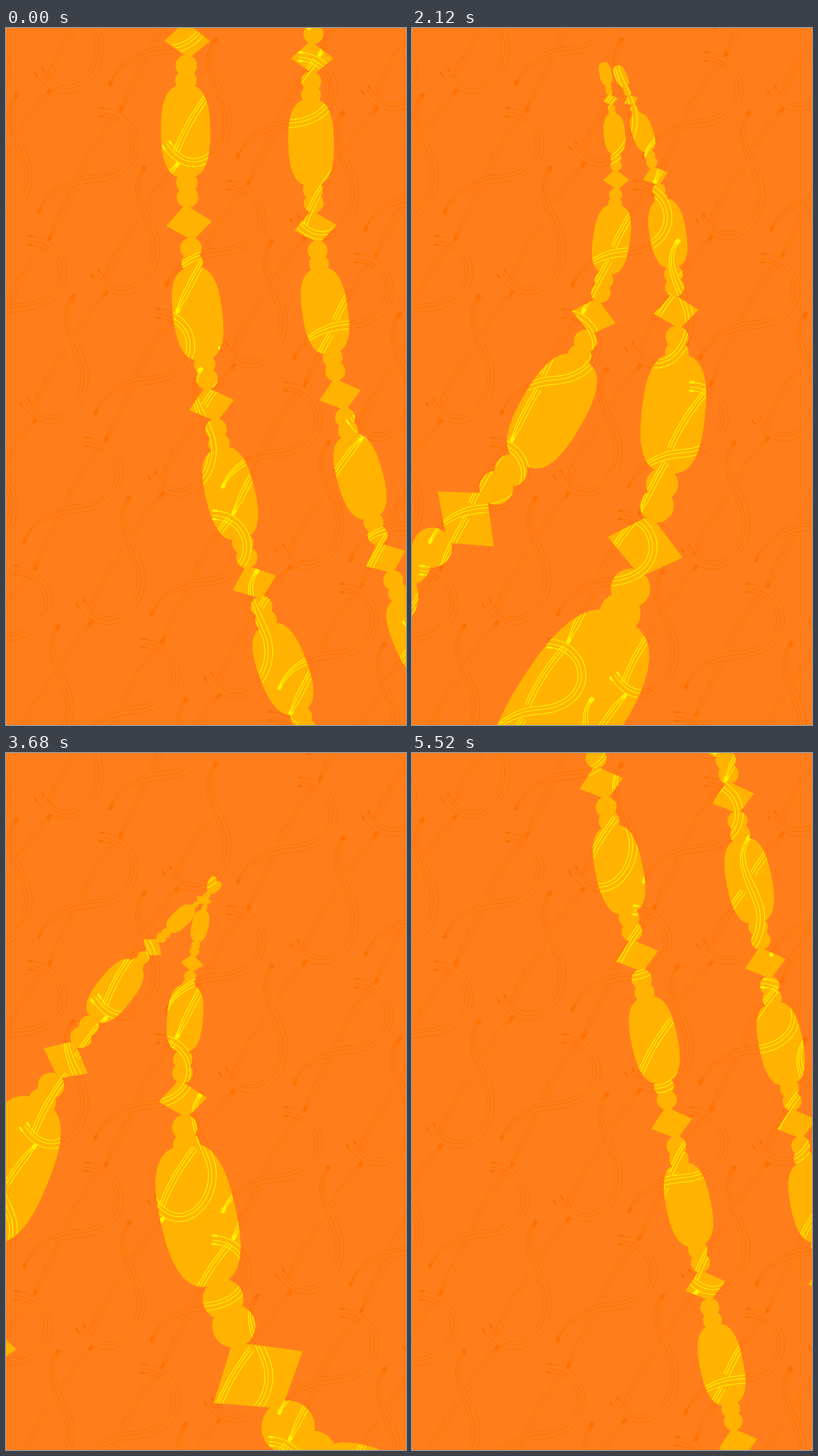
These frames come from a looping animation (567 px wide and 988 px high, 5.6 s). An HTML page:

```html
<!DOCTYPE html>
<html lang="en">
<head>
<meta charset="utf-8">
<title>Swinging beads</title>
<style>
html, body { margin: 0; width: 100%; height: 100%; overflow: hidden; background: #ff7e1b; }
svg { display: block; width: 100vw; height: 100vh; }
</style>
</head>
<body>
<svg viewBox="0 0 567 988" preserveAspectRatio="none">
  <defs>
    <g id="cell" fill="none" stroke="currentColor">
      <path id="threads"/>
      <path id="tips" stroke-width="3.2" stroke-linecap="round"/>
    </g>
    <g id="net"></g>
    <clipPath id="mask"><path id="hole"/></clipPath>
  </defs>
  <rect width="567" height="988" fill="#ff7e1b"/>
  <use href="#net" color="#ff7000" stroke-width=".9"/>
  <path id="beads" fill="#ffb300"/>
  <g clip-path="url(#mask)"><use href="#net" color="#fff000" stroke-width="1.2"/></g>
</svg>
<script>
const LOOP = 5600, STEP = 40, RAD = Math.PI / 180;
const $ = id => document.getElementById(id);
const svg = name => document.createElementNS('http://www.w3.org/2000/svg', name);
const f = n => n.toFixed(1);
const lerp = (a, b, u) => a + (b - a) * u;
const poly = pts => 'M' + pts.map(p => f(p[0]) + ' ' + f(p[1])).join('L');

// ---------- woven cords, repeated on a slanted lattice ----------
let threads = '', tips = '';

// Three threads along a curve; w0, w and w1 are half widths at start, middle and end
function cord(d, w0, w, w1, tipStart, tipEnd) {
  const path = svg('path');
  path.setAttribute('d', d);
  const len = path.getTotalLength(), n = Math.ceil(len / 5);
  const at = u => path.getPointAtLength(u * len);
  for (const side of [-1, .15, 1]) {
    const pts = Array.from({ length: n + 1 }, (_, i) => {
      const u = i / n, p = at(u), a = at(Math.max(0, u - .01)), b = at(Math.min(1, u + .01));
      const dx = b.x - a.x, dy = b.y - a.y, h = Math.hypot(dx, dy);
      const off = side * (u < .3 ? lerp(w0, w, u / .3) : lerp(w, w1, Math.max(0, u - .7) / .3));
      return [p.x - dy / h * off, p.y + dx / h * off];
    });
    threads += poly(pts);
    if (side === .15) continue;
    if (tipStart) tips += poly(pts.slice(0, 2));
    if (tipEnd) tips += poly(pts.slice(-2));
  }
}

cord('M133 119C195 121 205 208 122 214C80 217 56 238 46 262', 6, 5.5, 1, true, true);
cord('M197 197C173 228 197 258 209 292C228 346 167 410 126 346', 1.5, 5.5, 6, true, true);
cord('M188 274Q157 313 140 358', 4, 4, 4);
cord('M143 374Q118 402 100 432', 1, 4, 4, true);
cord('M158 124Q124 163 105 207', 4, 4, 4);
cord('M99 226Q78 262 61 300', 4, 4, 1, false, true);
$('threads').setAttribute('d', threads);
$('tips').setAttribute('d', tips);

for (let m = -5; m < 8; m++) for (let n = -5; n < 8; n++) {
  const x = 181 * m - 101 * n, y = 103.5 * m + 182 * n;
  if (x < -240 || x > 540 || y < -310 || y > 890) continue;
  const copy = svg('use');
  copy.setAttribute('href', '#cell');
  copy.setAttribute('x', x);
  copy.setAttribute('y', y);
  $('net').append(copy);
}

// ---------- motion ----------
// A strand is a circular arc: x, y and heading (degrees from straight down) at one
// square bead, bend per 100 px, and the gap to the next square bead. Each further
// gap is `grow` times longer, which gives the perspective.
const pose = (grow, a, b) => [grow, ...a, ...b];
const mix = (a, b, u) => a.map((v, i) => lerp(v, b[i], u));

const hang = pose(1, [257, 17, -2.7, 2.5, 259], [434, 42, -2.5, 3, 240]);
const left = pose(1, [233, 54, -8.4, 0, 208], [314, 52, -4.3, -.9, 214]);
const fling = pose(2.1, [361, 357, 31, 10, 327], [481, 270, 78, 14, 265]);
const near = pose(2.2, [317, 322, 9, -9.7, 211], [370, 313, 26, -9, 201]);
const sweep = pose(2.12, [208, 275, -43, 5.5, 202], [264, 298, -10, 6.3, 193]);
const open = pose(1.05, [255, 68, -12, -2.5, 200], [328, 53, 7.5, 3.2, 198]);
const right = pose(.97, [268, 42, 11.7, 0, 250], [455, 63, 11, 0, 239]);

const keys = [
  [0, hang], [720, left], [1520, fling], [1960, mix(near, open, .45)], [2800, near],
  [3680, sweep], [4320, mix(sweep, open, .12)], [4880, open], [5520, right]
];
const key = i => {
  const n = keys.length, [t, p] = keys[(i + n) % n];
  return [t + LOOP * Math.floor(i / n), p];
};

// Smooth periodic spline through the poses
function poseAt(t) {
  const i = keys.findLastIndex(k => k[0] <= t);
  const [a, b, c, d] = [-1, 0, 1, 2].map(j => key(i + j));
  const h = c[0] - b[0], u = (t - b[0]) / h, u2 = u * u, u3 = u2 * u;
  return b[1].map((p, j) => {
    const q = c[1][j];
    const v0 = (q - a[1][j]) / (c[0] - a[0]) * h;
    const v1 = (d[1][j] - p) / (d[0] - b[0]) * h;
    return (2 * u3 - 3 * u2 + 1) * p + (u3 - 2 * u2 + u) * v0 + (3 * u2 - 2 * u3) * q + (u3 - u2) * v1;
  });
}

// ---------- beads ----------
const pow = (v, e) => Math.sign(v) * Math.abs(v) ** e;
const barrel = Array.from({ length: 36 }, (_, i) => {
  const a = i * 10 * RAD;
  return [.135 * pow(Math.cos(a), .7), .255 * pow(Math.sin(a), .8)];
});
const square = [[.125, 0], [.015, .1], [-.125, .01], [-.015, -.1]];
const ball = Array.from({ length: 20 }, (_, i) => [.059 * Math.cos(i * 18 * RAD), .059 * Math.sin(i * 18 * RAD)]);

function strand(grow, x, y, heading, bend, gap) {
  const g = Math.abs(grow - 1) < 1e-3 ? 1.001 : grow;
  const curl = bend / 100 * RAD;
  let d = '';
  const bead = (v, shape) => {
    const along = gap * (g ** v - 1) / (g - 1);
    if (v < -1.75 || along > 1100) return;
    const size = gap * Math.log(g) / (g - 1) * g ** v;
    const turn = curl * along, a = heading * RAD + turn, mid = a - turn / 2;
    const chord = Math.abs(turn) < 1e-6 ? along : along * Math.sin(turn / 2) / (turn / 2);
    const px = x + chord * Math.sin(mid), py = y + chord * Math.cos(mid);
    const tx = Math.sin(a) * size, ty = Math.cos(a) * size;
    d += poly(shape.map(([n, t]) => [px + n * ty + t * tx, py + t * ty - n * tx])) + 'Z';
  };
  for (let k = -2; k < 6; k++) {
    bead(k, square);
    bead(k + .5, barrel);
    for (const o of [.14, .22, .78, .86]) bead(k + o, ball);
  }
  return d;
}

function draw(t) {
  const [grow, ...p] = poseAt(t);
  const d = strand(grow, ...p.slice(0, 5)) + strand(grow, ...p.slice(5));
  $('beads').setAttribute('d', d);
  $('hole').setAttribute('d', d);
}

const start = performance.now();
function tick() {
  const t = (performance.now() - start) % LOOP;
  draw(Math.floor(t / STEP) * STEP);
  requestAnimationFrame(tick);
}
draw(0);
requestAnimationFrame(tick);
</script>
</body>
</html>
```
